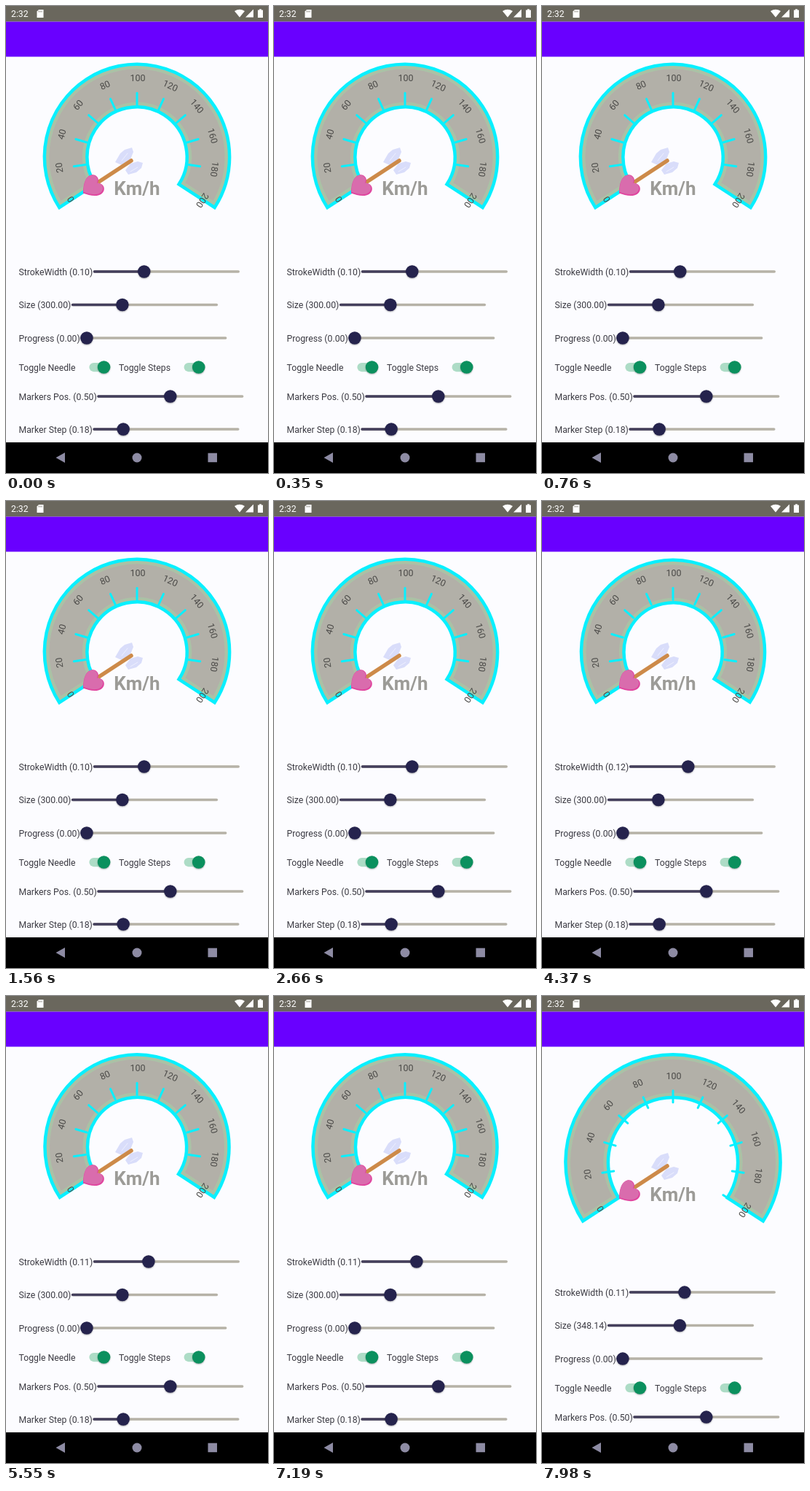
Animation of 360x640 px, one loop 8 s. Source, as an HTML page with a canvas:

```html
<!DOCTYPE html>
<html lang="en">
<head>
<meta charset="utf-8">
<title>Gauge settings</title>
<style>
  html, body { margin: 0; width: 100%; height: 100%; overflow: hidden; background: #fcfcff; }
  canvas { display: block; width: 360px; height: 640px; }
</style>
</head>
<body>
<canvas id="stage"></canvas>
<script>
const LOOP = 8000;
const DP = 0.875;
const CYAN = '#08f0ff';
const THUMB = '#25234d';
const FONT = 'Roboto, sans-serif';
const STEP = 24.6 * Math.PI / 180;
const TRACK = 201.25;

const canvas = document.getElementById('stage');
const ctx = canvas.getContext('2d');
const ratio = window.devicePixelRatio || 1;
canvas.width = 360 * ratio;
canvas.height = 640 * ratio;

// Keys are [time, value] pairs, eased from one to the next.
function track(keys, t) {
  if (t <= keys[0][0]) return keys[0][1];
  for (let i = 1; i < keys.length; i++) {
    const [t0, v0] = keys[i - 1], [t1, v1] = keys[i];
    if (t < t1) {
      const p = (t - t0) / (t1 - t0);
      return v0 + (v1 - v0) * p * p * (3 - 2 * p);
    }
  }
  return keys[keys.length - 1][1];
}

const strokeKeys = [[3300, 0.1], [4250, 0.118], [4420, 0.118], [5150, 0.11]];
const sizeKeys = [[7210, 300], [7450, 348.14]];

function text(str, x, y, size, color, align = 'left', weight = 400) {
  ctx.font = `${weight} ${size}px ${FONT}`;
  ctx.fillStyle = color;
  ctx.textAlign = align;
  ctx.textBaseline = 'alphabetic';
  ctx.fillText(str, x, y);
}

function line(x0, y0, x1, y1, width, color, cap = 'round') {
  ctx.beginPath();
  ctx.moveTo(x0, y0);
  ctx.lineTo(x1, y1);
  ctx.lineWidth = width;
  ctx.lineCap = cap;
  ctx.strokeStyle = color;
  ctx.stroke();
}

function dot(x, y, r, color) {
  ctx.beginPath();
  ctx.arc(x, y, r, 0, Math.PI * 2);
  ctx.fillStyle = color;
  ctx.fill();
}

function shape(color, ...pts) {
  ctx.beginPath();
  pts.forEach(([x, y]) => ctx.lineTo(x, y));
  ctx.closePath();
  ctx.fillStyle = color;
  ctx.fill();
}

function raised(draw) {
  ctx.save();
  ctx.shadowColor = 'rgba(0,0,0,0.3)';
  ctx.shadowBlur = 2 * ratio;
  ctx.shadowOffsetY = ratio;
  draw();
  ctx.restore();
}

function gauge(cx, cy, radius, stroke) {
  const outer = radius - 4.1 - (stroke - 0.1) * 60;
  const inner = outer - 58.5;
  const from = -Math.PI / 2 - 5 * STEP, to = -Math.PI / 2 + 5 * STEP;

  ctx.beginPath();
  ctx.arc(cx, cy, outer, from, to);
  ctx.arc(cx, cy, inner, to, from, true);
  ctx.closePath();
  ctx.fillStyle = '#b2b0a8';
  ctx.fill();
  ctx.save();
  ctx.clip();
  ctx.lineWidth = 13;
  ctx.strokeStyle = 'rgba(165,210,165,0.55)';
  ctx.stroke();
  ctx.restore();
  ctx.lineWidth = 4.5;
  ctx.lineJoin = 'miter';
  ctx.strokeStyle = CYAN;
  ctx.stroke();

  const tickR = radius / 2 + 14;
  const labelR = radius / 2 + 42.4;
  for (let i = 0; i <= 10; i++) {
    ctx.save();
    ctx.translate(cx, cy);
    ctx.rotate((i - 5) * STEP);
    line(0, -tickR - 8, 0, -tickR + 8, 3, CYAN);
    text(String(i * 20), 1, -labelR + 4.5, 12.5, '#4b4a48', 'center');
    ctx.restore();
  }
}

function needle(cx, cy) {
  ctx.save();
  ctx.translate(cx, cy);
  shape('#d9ddfa', [-30, 7], [-23, -5], [-17, -10], [-7, -13], [-5, -7], [-9, 3], [-19, 12]);
  shape('#d9ddfa', [-16, 18], [-9, 9], [1, 6], [8, 8], [6, 15], [-1, 21], [-12, 24]);
  line(-21, 5, -13, -5, 1, '#eef0ff');
  line(-9, 20, 1, 14, 1, '#eef0ff');
  line(-54, 35, -8, 5, 5.5, '#cd8a49');

  // Heart, tip toward the lower left.
  ctx.translate(-60, 40);
  ctx.rotate(56 * Math.PI / 180);
  heart('#e0459f');
  ctx.translate(-1, 0);
  ctx.scale(0.92, 0.92);
  heart('#d96cad');
  ctx.restore();
}

function heart(color) {
  ctx.beginPath();
  ctx.moveTo(0, 17);
  ctx.bezierCurveTo(-7, 12, -15, 5, -15, -3);
  ctx.bezierCurveTo(-15, -12, -4, -15, 0, -7);
  ctx.bezierCurveTo(4, -15, 15, -12, 15, -3);
  ctx.bezierCurveTo(15, 5, 7, 12, 0, 17);
  ctx.fillStyle = color;
  ctx.fill();
}

function slider(name, value, fraction, y) {
  const label = `${name} (${value.toFixed(2)})`;
  text(label, 17.5, y + 4.5, 12.25, '#3b3a42');
  const x = 17.5 + ctx.measureText(label).width + 0.5;
  const thumb = x + 8.75 + fraction * (TRACK - 17.5);
  line(x + 1.75, y, x + TRACK - 1.75, y, 3.5, '#b6b2a7');
  line(x + 1.75, y, thumb, y, 3.5, '#443f5c');
  raised(() => dot(thumb, y, 8.75, THUMB));
}

function toggle(name, x, thumbX, y) {
  text(name, x, y + 4.5, 12.25, '#3b3a42');
  line(thumbX - 14, y, thumbX + 3, y, 12.25, '#addcc6');
  raised(() => dot(thumbX, y, 8.75, '#0b905e'));
}

function statusBar() {
  ctx.fillStyle = '#6a675d';
  ctx.fillRect(0, 0, 360, 21.5);
  ctx.fillStyle = '#6900ff';
  ctx.fillRect(0, 21.5, 360, 48);
  text('2:32', 7, 15, 12.25, '#fff');
  shape('#fff', [45, 5], [51.5, 5], [51.5, 16], [42.5, 16], [42.5, 7.5]);
  [45, 47, 49].forEach(x => line(x, 6.5, x, 8.5, 0.8, '#6a675d', 'butt'));

  ctx.beginPath();
  ctx.moveTo(321, 15.5);
  ctx.lineTo(314, 7);
  ctx.quadraticCurveTo(321, 2.5, 328, 7);
  ctx.closePath();
  ctx.fillStyle = '#fff';
  ctx.fill();
  shape('#fff', [329, 15.5], [340, 15.5], [340, 4.5]);
  ctx.fillRect(346, 5.5, 7, 10.5);
  ctx.fillRect(348, 4.3, 3, 1.5);
}

function navBar() {
  ctx.fillStyle = '#000';
  ctx.fillRect(0, 598, 360, 42);
  const color = '#8d8ba3';
  shape(color, [68.5, 619], [81, 612], [81, 626]);
  dot(180, 619, 6.5, color);
  ctx.fillStyle = color;
  ctx.fillRect(277.5, 612.7, 12.5, 12.5);
}

function draw(t) {
  const stroke = track(strokeKeys, t);
  const size = track(sizeKeys, t);
  const radius = size * DP / 2;
  const cy = 75.7 + radius;
  const drop = (size - 300) * DP;

  ctx.setTransform(ratio, 0, 0, ratio, 0, 0);
  ctx.fillStyle = '#fcfcff';
  ctx.fillRect(0, 0, 360, 640);

  gauge(180, cy, radius, stroke);
  needle(180, cy);
  text('Km/h', 180, cy + 52.5, 26, '#9c9b97', 'center', 700);

  slider('StrokeWidth', stroke, stroke / 0.3, 364 + drop);
  slider('Size', size, (size - 200) / 300, 409.5 + drop);
  slider('Progress', 0, 0, 455 + drop);
  toggle('Toggle Needle', 17.5, 134.5, 495 + drop);
  toggle('Toggle Steps', 155, 264.7, 495 + drop);
  slider('Markers Pos.', 0.5, 0.5, 535 + drop);
  slider('Marker Step', 0.18, 0.18, 580 + drop);

  statusBar();
  navBar();
}

const start = performance.now();
function frame() {
  draw((performance.now() - start) % LOOP);
  requestAnimationFrame(frame);
}
frame();
</script>
</body>
</html>
```
